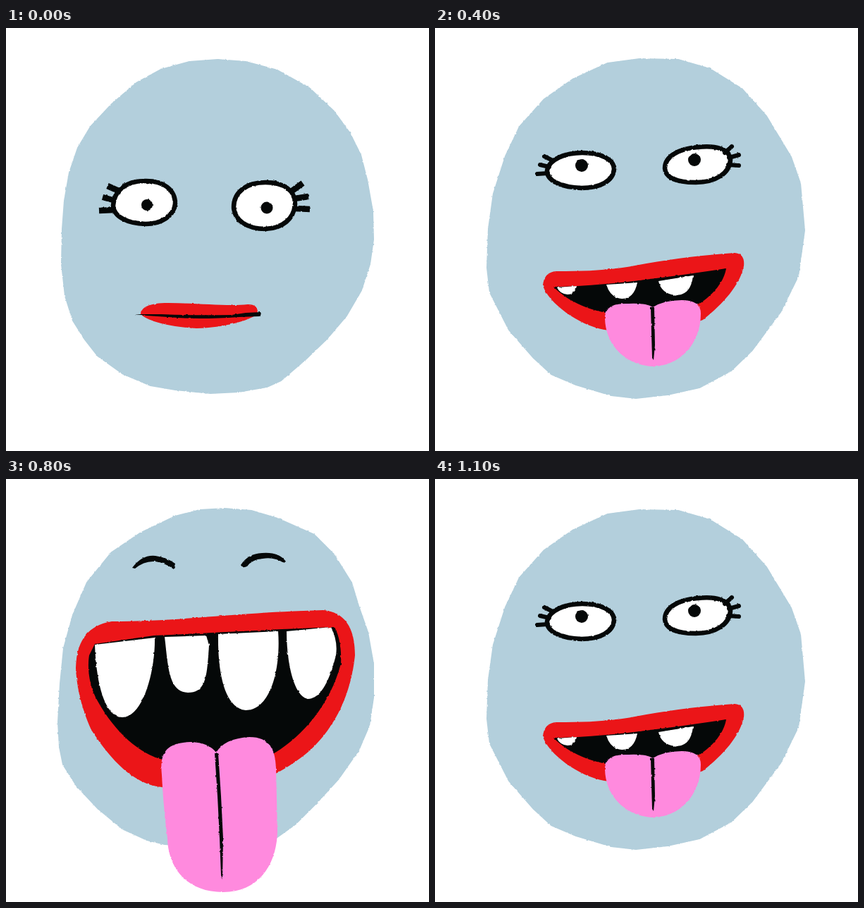
Animation, 600 px wide and 600 px high, one loop 1200 ms. Source, as an HTML page without scripts:

```html
<!DOCTYPE html>
<html lang="en">
<head>
<meta charset="utf-8">
<title>Laughing face</title>
<style>
  html, body { margin: 0; width: 100%; height: 100%; overflow: hidden; background: #fff; }
  svg { display: block; width: 100vw; height: 100vh; }
  .head { fill: #b3cfdc; stroke: #b3cfdc; stroke-width: 2; stroke-linejoin: round; }
  .eye { fill: #fff; stroke: #050808; stroke-width: 6.5; stroke-linejoin: round; }
  .lash { fill: none; stroke: #050808; stroke-width: 8.5; }
  .fine { stroke-width: 6; stroke-linecap: round; }
  .ink { fill: #050808; }
  .lips { fill: #eb1518; }
  .teeth { fill: #fff; }
  .tongue { fill: #ff8ade; }
</style>
</head>
<body>
<svg viewBox="0 0 600 600">
  <defs>
    <!-- crayon edge -->
    <filter id="rough" filterUnits="userSpaceOnUse" x="0" y="0" width="600" height="600" color-interpolation-filters="sRGB">
      <feTurbulence type="fractalNoise" baseFrequency=".22" numOctaves="2" seed="4"/>
      <feDisplacementMap in="SourceGraphic" scale="2.4" xChannelSelector="R" yChannelSelector="G"/>
    </filter>
  </defs>

  <!-- calm, first drawing -->
  <g filter="url(#rough)">
    <animate attributeName="opacity" dur="1.2s" repeatCount="indefinite" calcMode="discrete" values="1;0;1;0;0;0;0;0;0;0;0;0"/>
    <path class="head" d="M300 45 340 48 385 60 430 85 465 118 487 148 503 180 512 215 520 260 521 300 516 335 504 372 483 408 455 441 425 470 390 500 370 509 330 516 290 518 240 513 205 507 165 490 130 465 112 442 95 415 84 380 79 335 80 285 83 245 90 205 102 170 120 140 150 108 185 78 220 59 260 48Z"/>
    <path class="eye" d="M152 252C153 231 170 217 196 217C224 216 240 230 240 249C238 267 220 278 198 278C172 277 153 268 152 252Z"/>
    <circle class="ink" cx="200" cy="251" r="8"/>
    <path class="lash" d="M144 224 162 232M137 240 156 245M132 259 154 258"/>
    <path class="eye" d="M323 254C323 233 341 219 368 219C395 219 410 231 410 249C409 271 392 284 368 285C342 285 324 273 323 254Z"/>
    <circle class="ink" cx="370" cy="255" r="8.5"/>
    <path class="lash" d="M403 233 421 220M409 242 429 239M410 256 431 257"/>
    <path class="lips" d="M191 406C192 396 203 390 230 390C270 390 315 395 343 392C357 392 358 400 356 406C345 415 310 425 270 426C230 424 200 415 191 406Z"/>
    <path class="ink" d="M182 406 220 406Q270 408 320 407L340 404 361 403Q363 407 359 409L330 410Q270 414 230 410L200 408Z"/>
  </g>

  <!-- calm, second drawing -->
  <g filter="url(#rough)">
    <animate attributeName="opacity" dur="1.2s" repeatCount="indefinite" calcMode="discrete" values="0;1;0;1;0;0;0;0;0;0;0;0"/>
    <path class="head" d="M290 44 330 45 380 60 432 84 460 112 487 150 505 185 516 220 522 255 522 290 515 340 500 383 470 435 440 466 402 497 365 512 305 522 255 521 215 513 180 500 145 475 115 440 95 410 78 375 73 340 78 290 83 240 98 185 125 133 155 102 185 77 215 58 250 47Z"/>
    <path class="eye" d="M151 249C156 225 178 212 203 212C228 213 242 228 242 247C242 268 222 283 200 283C176 281 159 268 151 249Z"/>
    <circle class="ink" cx="202" cy="252" r="8.5"/>
    <path class="lash" d="M145 220 159 231M132 238 152 242M131 258 152 258"/>
    <path class="eye" d="M323 254C322 232 341 217 368 217C395 217 411 231 412 248C411 272 391 283 368 285C343 285 325 275 323 254Z"/>
    <circle class="ink" cx="367" cy="255" r="9"/>
    <path class="lash" d="M403 232 422 220M409 244 428 236M413 258 434 254"/>
    <path class="lips" d="M191 403C192 389 205 385 235 386C270 383 300 382 325 385C345 387 356 394 357 405C346 421 315 429 275 429C235 428 195 423 191 403Z"/>
    <path class="ink" d="M182 404 220 402Q280 404 364 403Q369 406 364 408L320 410Q270 413 225 408L184 406Z"/>
  </g>

  <!-- grin -->
  <g filter="url(#rough)">
    <animate attributeName="opacity" dur="1.2s" repeatCount="indefinite" calcMode="discrete" values="0;0;0;0;1;0;0;0;0;0;0;1"/>
    <path class="head" d="M345 45 290 44 245 50 195 73 155 101 120 140 100 182 83 235 76 285 74 340 78 375 105 428 140 468 165 491 200 506 250 521 285 525 330 520 375 510 420 486 450 457 490 403 515 352 524 287 518 220 505 183 470 125 435 86 390 58Z"/>
    <path class="eye" d="M159 202C162 186 185 177 209 177C236 177 254 187 254 200C253 217 234 227 208 227C180 226 158 217 159 202Z"/>
    <circle class="ink" cx="208" cy="195" r="9"/>
    <path class="lash fine" d="M155 182 167 188M149 194 162 197M145 207 160 206"/>
    <path class="eye" d="M326 199C326 182 346 171 373 169C398 166 419 172 419 187C418 206 398 219 370 219C344 219 327 213 326 199Z"/>
    <circle class="ink" cx="368" cy="187" r="9"/>
    <path class="lash fine" d="M411 177 421 168M417 184 431 180M416 194 431 195"/>
    <path class="lips" d="M153 365Q155 346 172 345C230 345 260 342 300 334C340 327 380 322 425 319Q440 320 438 338C432 365 410 390 380 414C340 430 270 432 240 428C205 422 160 390 153 365Z"/>
    <path class="ink" d="M168 367C230 367 320 355 413 341C410 360 395 378 374 392L250 405C225 402 190 390 168 367Z"/>
    <path class="teeth" d="M173 368 201 366C199 375 194 378 188 378Q177 377 173 368ZM243 364 287 361C284 377 276 384 265 384Q249 383 243 364ZM317 359 366 351C364 371 355 379 341 379Q321 377 317 359Z"/>
    <path class="tongue" d="M241 412C241 395 255 390 275 391Q300 390 309 396Q325 386 350 386Q377 386 377 405C377 450 345 480 309 480C270 478 242 450 241 412Z"/>
    <path class="ink" d="M306 396 311 396 312 450 310 471 308 468Z"/>
  </g>

  <!-- open mouth -->
  <g filter="url(#rough)">
    <animate attributeName="opacity" dur="1.2s" repeatCount="indefinite" calcMode="discrete" values="0;0;0;0;0;1;0;0;0;0;1;0"/>
    <path class="head" d="M300 41 270 43 245 48 205 66 160 98 130 127 108 155 93 195 82 245 77 290 74 335 78 375 84 408 110 448 140 481 170 503 205 513 245 519 290 520 365 512 395 498 430 470 470 430 500 385 515 340 521 295 518 240 512 200 490 147 455 100 420 73 385 55 350 45Z"/>
    <path class="eye" d="M164 149C180 139 215 140 232 147C243 152 243 163 234 165C210 164 180 160 164 152Z"/>
    <circle class="ink" cx="215" cy="150" r="8"/>
    <path class="lash fine" d="M168 138 170 146M161 143 168 150M158 152 166 152"/>
    <path class="eye" d="M338 149C342 137 370 131 395 132C411 133 412 140 407 148C395 154 370 151 345 156C338 155 337 152 338 149Z"/>
    <circle class="ink" cx="370" cy="139" r="9"/>
    <path class="lash fine" d="M404 136 410 129M406 141 414 138M405 147 414 149"/>
    <path class="lips" d="M109 292Q110 279 130 273C190 255 240 248 310 246C360 243 400 240 440 240C475 243 486 250 486 268C483 310 465 350 430 382C400 410 340 440 290 440C240 440 190 420 155 390C130 365 112 325 109 292Z"/>
    <path class="ink" d="M125 294C180 275 240 267 320 265L467 262Q469 268 466 283C455 325 420 375 373 395L295 405 222 404C170 382 128 330 125 294Z"/>
    <path class="teeth" d="M136 291 187 278C186 305 175 324 160 324C148 324 139 310 136 291ZM228 269 279 265C280 290 270 302 253 302C236 301 229 288 228 269ZM306 266 374 265C370 300 358 320 340 320C318 320 308 300 306 266ZM409 264 449 263C446 282 438 293 430 293C420 292 410 280 409 264Z"/>
    <path class="tongue" d="M222 425C220 395 235 382 262 382Q285 384 295 395Q312 376 340 376C368 378 374 400 376 430C378 470 373 500 355 535C340 555 320 568 292 568C260 562 243 530 233 495C226 470 222 445 222 425Z"/>
    <path class="ink" d="M292 396 295 396Q301 415 301 435L304 470 308 520 307 558 304 550 304 520 298 470 297 430Z"/>
  </g>

  <!-- full laugh -->
  <g filter="url(#rough)">
    <animate attributeName="opacity" dur="1.2s" repeatCount="indefinite" calcMode="discrete" values="0;0;0;0;0;0;1;1;1;1;0;0"/>
    <path class="head" d="M310 42 348 45 385 56 437 79 465 107 490 147 500 180 513 217 521 262 521 310 515 350 500 385 472 425 440 460 410 490 382 510 340 519 270 521 225 518 200 512 165 496 130 467 100 435 81 405 76 380 74 345 77 290 82 240 95 193 115 147 150 104 190 77 240 53 275 44Z"/>
    <path class="ink" d="M179 126Q193 107 212 109Q230 112 240 120L238 128Q224 118 211 117Q196 116 183 127ZM333 122Q343 106 363 105Q387 103 397 117L394 119Q380 110 364 113Q349 114 342 124Q335 127 333 122Z"/>
    <path class="lips" d="M99 268C100 235 112 208 150 202C250 202 330 189 450 186C480 189 495 210 495 250C490 300 470 350 430 386C395 415 350 440 290 443C270 442 240 440 220 437C180 432 150 400 121 356C105 320 100 290 99 268Z"/>
    <path class="ink" d="M126 234 210 222C300 218 380 213 466 210C474 225 476 245 475 262C460 320 420 365 382 388L300 400 222 398C190 390 155 360 130 315C118 295 115 268 118 250Z"/>
    <path class="teeth" d="M126 235 211 225C212 270 195 338 165 338C140 338 128 290 126 235ZM225 224 284 222 288 236C285 280 284 303 258 303C230 302 230 265 225 224ZM301 220 386 216C390 270 375 328 340 328C310 325 300 275 301 220ZM398 216 461 210Q471 230 468 250C458 290 445 312 428 312C408 308 398 260 398 216Z"/>
    <path class="tongue" d="M221 420C218 390 225 374 262 373Q288 374 298 388Q310 368 345 366C375 366 382 385 383 410L385 500C384 545 360 586 308 586C255 586 230 550 229 510C224 470 222 440 221 420Z"/>
    <path class="ink" d="M296 389 301 389 305 450 308 510 307 568 305 562 303 510 300 450Z"/>
  </g>
</svg>
</body>
</html>
```
